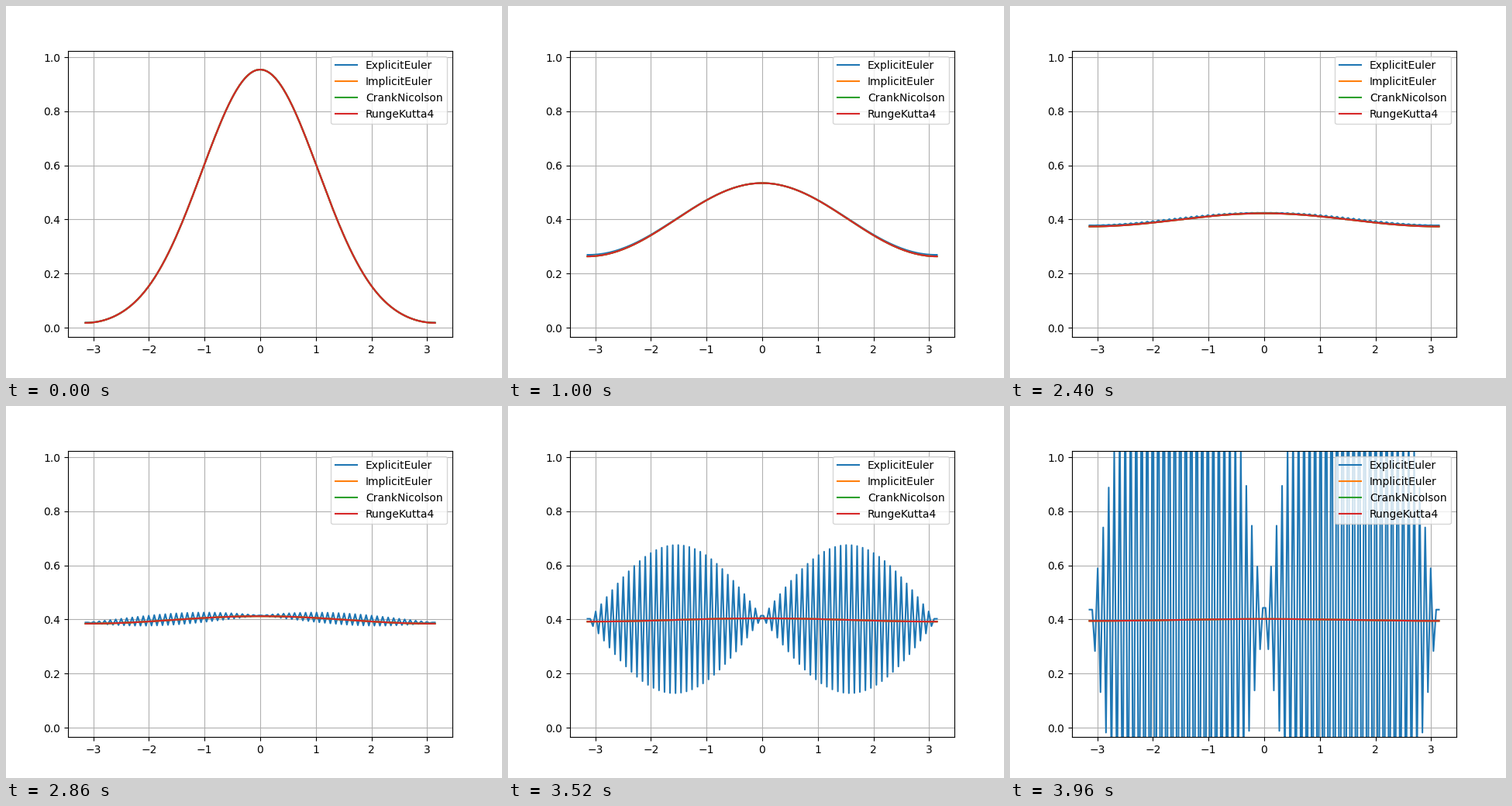
Write a matplotlib script that moves like this. It is 640 by 480 pixels and loops after 3.98 s.

```python
"""Heat equation with insulated ends, advanced by four time-stepping schemes."""
import numpy as np
import matplotlib.pyplot as plt
from matplotlib.animation import FuncAnimation

N = 128            # grid points
DT = 0.001227      # just above the explicit stability limit
SUBSTEPS = 20      # time steps per frame
FRAMES = 199
INTERVAL = 20      # ms

x = np.linspace(-np.pi, np.pi, N)
r = DT / (x[1] - x[0]) ** 2
I = np.eye(N)


def laplacian():
    """Second difference with mirrored neighbours at both ends."""
    lap = -2 * I + np.eye(N, k=1) + np.eye(N, k=-1)
    lap[0, 1] = lap[-1, -2] = 2
    return lap


def explicit_step(A):
    """Forward step on the interior; the end points copy their neighbours."""
    step = I + A
    step[0], step[-1] = step[1], step[-2]
    return step


A = r * laplacian()
schemes = {
    "ExplicitEuler": explicit_step(A),
    "ImplicitEuler": np.linalg.inv(I - A),
    "CrankNicolson": np.linalg.solve(I - A / 2, I + A / 2),
    "RungeKutta4": I + A @ (I + A / 2 @ (I + A / 3 @ (I + A / 4))),
}


def solve(step):
    """States after each block of SUBSTEPS steps, starting from a Gaussian."""
    block = np.linalg.matrix_power(step, SUBSTEPS)
    u = np.exp(-x ** 2 / 2)
    states = []
    for _ in range(FRAMES + 1):
        u = block @ u
        states.append(u)
    return states


runs = [solve(step) for step in schemes.values()]

fig, ax = plt.subplots(figsize=(6.4, 4.8), dpi=100)
lines = [ax.plot(x, run[0], label=name)[0] for name, run in zip(schemes, runs)]
ax.grid(True)
ax.legend(loc="best")

# Keep the limits of the first state for the whole run.
ax.set_xlim(ax.get_xlim())
ax.set_ylim(ax.get_ylim())


def update(i):
    for line, run in zip(lines, runs):
        line.set_ydata(run[i + 1])
    return lines


anim = FuncAnimation(fig, update, frames=FRAMES, interval=INTERVAL,
                     repeat=True, repeat_delay=0, blit=False)
plt.show()
```
